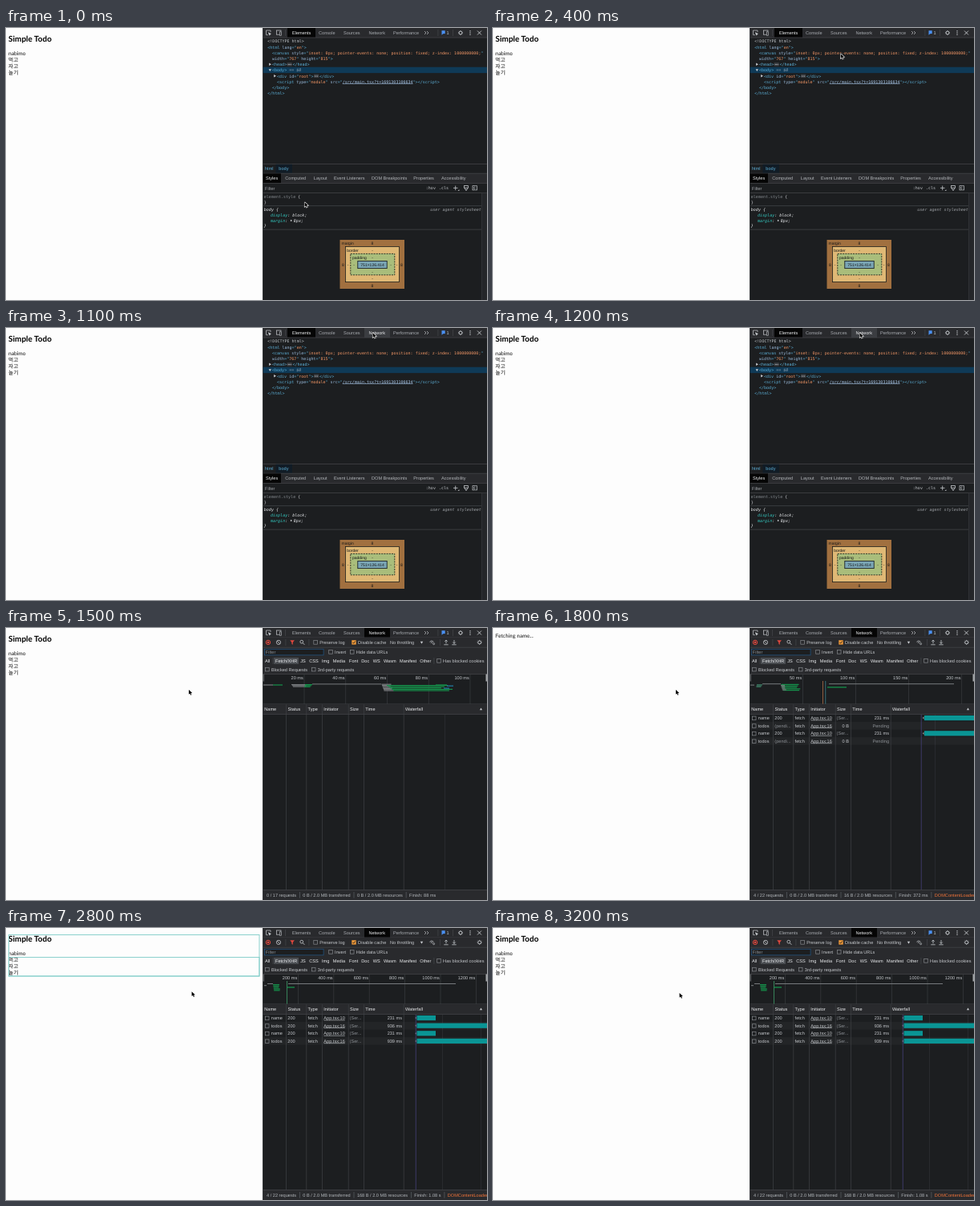
Animation of 600 by 339 pixels, one loop 3.3 s. Source, as an HTML page with a canvas:

```html
<!DOCTYPE html>
<html lang="en">
<head>
<meta charset="utf-8">
<title>Simple Todo</title>
<style>
html, body { margin: 0; width: 100%; height: 100%; overflow: hidden; background: #fdfdfd; }
canvas { display: block; width: 600px; height: 339px; }
</style>
</head>
<body>
<canvas id="stage"></canvas>
<script>
const LOOP = 3300, STEP = 100;
const cv = document.getElementById('stage');
const dpr = window.devicePixelRatio || 1;
cv.width = 600 * dpr;
cv.height = 339 * dpr;
const c = cv.getContext('2d');

const UI = '"Liberation Sans", Arial, sans-serif';
const MONO = '"DejaVu Sans Mono", monospace';
const PAGE = 'Lato, "Noto Sans CJK KR", "Noto Sans CJK", sans-serif';
const BG = '#1c1e20', BAR = '#292a2d', LINE = '#414347', TXT = '#c6c9cd', DIM = '#8c9095', WHITE = '#eceef0';
const TAG = '#5db0d7', ATTR = '#9bbbdc', VAL = '#f29766', TEAL = '#0a9595', GREEN = '#15904a';

function box(x, y, w, h, col) { c.fillStyle = col; c.fillRect(x, y, w, h); }
function frame(x, y, w, h, col, lw = 1) { c.strokeStyle = col; c.lineWidth = lw; c.strokeRect(x, y, w, h); }
function path(pts, col, lw = .8, fill = false) {
  c.beginPath();
  for (let i = 0; i < pts.length; i += 2) c.lineTo(pts[i], pts[i + 1]);
  if (fill) { c.closePath(); c.fillStyle = col; c.fill(); }
  else { c.strokeStyle = col; c.lineWidth = lw; c.stroke(); }
}
function ring(x, y, r, col, lw = .8) {
  c.beginPath(); c.arc(x, y, r, 0, 7);
  c.strokeStyle = col; c.lineWidth = lw; c.stroke();
}
function disc(x, y, r, col) { c.beginPath(); c.arc(x, y, r, 0, 7); c.fillStyle = col; c.fill(); }
function hline(y, x = 320, x2 = 600, col = LINE) { box(x, y, x2 - x, .8, col); }
function vline(x, y, y2, col = LINE) { box(x, y, .8, y2 - y, col); }

// y is the middle of the capitals; returns the width. Type is set at 10x for exact advances.
function text(s, x, y, col = TXT, o = {}) {
  const size = o.size || 5.6;
  c.save();
  c.translate(x, y + .36 * size);
  c.scale(.1, .1);
  c.textRendering = 'geometricPrecision';
  c.font = `${o.style || ''} ${size * 10}px ${o.font || UI}`;
  c.textAlign = o.align || 'left';
  c.fillStyle = col;
  c.fillText(s, 0, 0);
  const w = c.measureText(s).width / 10;
  c.restore();
  return w;
}
// Pairs of string and colour, set in monospace.
function code(x, y, runs, style = '') {
  for (let i = 0; i < runs.length; i += 2)
    x += text(runs[i], x, y, runs[i + 1], { font: MONO, size: 5.03, style });
  return x;
}
function dots(x, y) {
  box(x, y - 2, 6, 4.2, '#3c4045');
  for (let i = 0; i < 3; i++) disc(x + 1.4 + i * 1.6, y + .2, .5, TXT);
}
function check(x, y, label, on) {
  if (on) {
    box(x, y - 2.7, 5.4, 5.4, '#f29a38');
    path([x + 1.2, y, x + 2.3, y + 1.3, x + 4.3, y - 1.4], '#222', .9);
  } else frame(x + .4, y - 2.3, 4.6, 4.6, '#85888c', .7);
  if (label) text(label, x + 7.8, y);
}
function tri(x, y, dir, col = TXT, r = 1.7) {
  if (dir === 'right') path([x - r * .7, y - r, x + r, y, x - r * .7, y + r], col, 0, true);
  else {
    const k = dir === 'up' ? -1 : 1;
    path([x - r, y - r * .7 * k, x + r, y - r * .7 * k, x, y + r * k], col, 0, true);
  }
}
function gear(x, y) {
  for (let i = 0; i < 8; i++) {
    const a = i * Math.PI / 4, u = Math.cos(a), v = Math.sin(a);
    path([x + u * 2, y + v * 2, x + u * 3, y + v * 3], TXT, .9);
  }
  ring(x, y, 1.9, TXT, .8);
}

function drawTabs(active, hover) {
  box(320, 0, 280, 12, BAR);
  path([327, 8.7, 324.5, 8.7, 324.5, 3, 330, 3, 330, 5], TXT, .7);
  path([326.8, 5.2, 330.8, 7, 328.6, 9.6], TXT, .8, true);
  frame(337.5, 3, 5.5, 5.2, TXT, .7);
  box(341, 4.5, 3, 5, BAR);
  frame(341.3, 4.8, 2.3, 4.4, TXT, .6);
  vline(348, 2, 10);
  const tabs = [['Elements', 357], ['Console', 390], ['Sources', 421], ['Network', 452.4], ['Performance', 483]];
  const back = { Elements: [351, 35], Network: [447, 32] };
  for (const [name, x] of tabs) {
    if (name === active) box(back[name][0], 0, back[name][1], 12, '#050505');
    else if (name === hover) box(back[name][0], 0, back[name][1], 12, '#3b3d41');
    text(name, x, 6, name === active || name === hover ? WHITE : '#a9adb2');
  }
  for (const x of [522, 525]) path([x, 4, x + 2, 6, x, 8], TXT, .7);
  vline(538.5, 2, 10);
  box(543.5, 3.2, 4.2, 3.9, '#4a90f0');
  path([543.5, 7, 545.5, 7, 543.5, 8.8], '#4a90f0', 0, true);
  text('1', 549.6, 6, TXT);
  vline(557, 2, 10);
  gear(567, 6);
  for (const y of [3.7, 6, 8.3]) disc(579, y, .7, TXT);
  path([588, 3.5, 593, 8.5], TXT, .9);
  path([593, 3.5, 588, 8.5], TXT, .9);
  hline(11.6);
}

function drawDom() {
  const attr = (n, v) => [' ' + n, ATTR, '="', TAG, v, VAL, '"', TAG];
  code(326.3, 16.6, ['<!DOCTYPE html>', '#c3c7cb']);
  code(326.3, 23.7, ['<html', TAG, ...attr('lang', 'en'), '>', TAG]);
  code(332, 30.9, ['<canvas', TAG,
    ...attr('style', 'inset: 0px; pointer-events: none; position: fixed; z-index: 1000000000;')]);
  code(332, 38.1, ['width', ATTR, '="', TAG, '767', VAL, '"', TAG, ...attr('height', '815'), '>', TAG]);
  tri(329.3, 45.2, 'right');
  dots(code(332, 45.2, ['<head>', TAG]) + .5, 45.2);
  code(357.4, 45.2, ['</head>', TAG]);
  box(320, 48.7, 280, 7.4, '#0f3a57');
  tri(329.3, 52.4, 'down');
  const x = code(332, 52.4, ['<body>', TAG]);
  code(x, 52.4, [' == $0', '#8fa3b3'], 'italic');
  tri(335.3, 59.7, 'right');
  dots(code(338, 59.7, ['<div', TAG, ...attr('id', 'root'), '>', TAG]) + .7, 59.7);
  code(391, 59.7, ['</div>', TAG]);
  const a = code(338, 67, ['<script', TAG, ...attr('type', 'module'), ' src', ATTR, '="', TAG]);
  const b = code(a, 67, ['/src/main.tsx?t=1691303106634', '#a9c7e8']);
  box(a, 69.4, b - a, .6, '#a9c7e8');
  code(b, 67, ['"></' + 'script>', TAG]);
  code(332, 74.2, ['</body>', TAG]);
  code(326.3, 81.5, ['</html>', TAG]);
}

function drawBoxModel() {
  const k = '#171717', o = { size: 5, align: 'center' };
  box(416.5, 264, 80.5, 61, '#a1703f');
  box(423, 272, 68, 45, '#dfb875');
  frame(423.4, 272.4, 67.2, 44.2, k, .8);
  box(429.5, 281, 55.5, 27, '#a9bd7b');
  c.setLineDash([2, 1.2]);
  frame(429.8, 281.4, 55, 26.4, k, .8);
  c.setLineDash([]);
  box(438.5, 290, 37, 10, '#7aa5b5');
  frame(438.8, 290.4, 36.4, 9.2, k, .8);
  text('margin', 418.5, 268.2, k, { size: 5 });
  text('border', 425.3, 276.8, k, { size: 5 });
  text('padding', 432, 285.8, k, { size: 5 });
  text('751×126.414', 457, 295, k, o);
  for (const [x, y] of [[457, 268.2], [457, 321], [420.3, 295], [493.5, 295]]) text('8', x, y, k, o);
  for (const [x, y] of [[457, 276.8], [457, 312.5], [457, 285.8], [457, 304], [426.5, 295], [487.7, 295], [434, 295], [480, 295]])
    text('-', x, y, k, o);
}

function drawElements(hover) {
  drawTabs('Elements', hover);
  drawDom();
  hline(169);
  box(336.5, 169.8, 20.5, 11, '#111c26');
  text('html', 323, 175.3, TAG);
  text('body', 340.3, 175.3, TAG);
  box(320, 181, 280, 12, BAR);
  hline(180.8);
  box(320, 181.4, 23, 12, '#050505');
  text('Styles', 324, 187.3, WHITE);
  [['Computed', 348.3], ['Layout', 383.8], ['Event Listeners', 409], ['DOM Breakpoints', 456],
   ['Properties', 508.3], ['Accessibility', 543]].forEach(([s, x]) => text(s, x, 187.3, '#b3b7bb'));
  hline(193);
  text('Filter', 323, 199.6, '#a0a4a8');
  code(523.8, 199.6, [':hov', TXT]);
  code(540, 199.6, ['.cls', TXT]);
  path([558, 199.4, 563.5, 199.4], TXT);
  path([560.7, 196.6, 560.7, 202.2], TXT);
  path([563.6, 203, 565.4, 203, 565.4, 201.2], TXT, 0, true);
  frame(571.5, 196.6, 5, 2.6, TXT, .8);
  path([572, 199.5, 574, 202.6, 576, 199.5], TXT, .9);
  frame(582, 196.7, 5.6, 5.2, TXT, .7);
  vline(585.3, 196.7, 202);
  path([585, 197.8, 583, 199.3, 585, 200.8], TXT, .7);
  hline(205);
  code(321.8, 210, ['element.style', '#858a8f', ' {', TXT]);
  code(321.8, 217, ['}', TXT]);
  hline(221.3, 320, 593);
  code(321.8, 226.2, ['body {', WHITE], 'italic');
  code(529.3, 226.2, ['user agent stylesheet', '#a0a4a8'], 'italic');
  code(330, 233.2, ['display', '#35c9c0', ': block;', WHITE], 'italic');
  const x = code(330, 240, ['margin', '#35c9c0', ': ', WHITE], 'italic');
  tri(x + 1.6, 240, 'right', TXT, 1.3);
  code(x + 4.6, 240, ['8px;', WHITE], 'italic');
  code(321.8, 246.2, ['}', WHITE], 'italic');
  hline(250.7, 320, 593);
  box(593.5, 205.8, 6.5, 134, '#242629');
  vline(593.2, 205.8, 339, '#34363a');
  drawBoxModel();
}

function drawNetTools() {
  box(320, 12, 280, 45, BAR);
  ring(327, 17.9, 2.7, '#e0483e', 1);
  box(325.8, 16.7, 2.4, 2.4, '#e0483e');
  ring(340, 17.9, 2.6, TXT, .8);
  path([338.2, 16, 341.8, 19.8], TXT, .8);
  vline(348.5, 14, 22);
  path([354.3, 15.3, 359.9, 15.3, 357.8, 18, 357.8, 20.8, 356.4, 20, 356.4, 18], '#e0483e', 0, true);
  ring(368.8, 17.2, 1.9, TXT, .8);
  path([370.2, 18.6, 372.4, 20.8], TXT, .9);
  vline(377.5, 14, 22);
  check(383.4, 17.9, 'Preserve log');
  check(431.3, 17.9, 'Disable cache', true);
  text('No throttling', 479, 17.9);
  tri(518.5, 18, 'down');
  for (const r of [1.6, 3.4]) {
    c.beginPath(); c.arc(531, 19.6, r, -2.4, -.75);
    c.strokeStyle = TXT; c.lineWidth = .8; c.stroke();
  }
  ring(533.6, 19.7, 1, TXT, .7);
  vline(541, 14, 22);
  for (const [x, k] of [[549, -1], [559, 1]]) {
    path([x, 15, x, 19.4], TXT);
    path([x - 1.7, 17.2 + k * .4, x, 17.2 + k * 2.2, x + 1.7, 17.2 + k * .4], TXT);
    path([x - 2.7, 20.8, x + 2.7, 20.8], TXT);
  }
  gear(590.7, 17.9);
  hline(23.8);
  box(322, 26, 74.5, 8, BG);
  frame(322.4, 26.3, 73.7, 7.5, '#24527c', .8);
  text('Filter', 323.8, 30.2, DIM);
  check(402.3, 29.9, 'Invert');
  check(429, 29.9, 'Hide data URLs');
  box(334, 36.9, 31, 8, '#4b4e53');
  [['All', 323], ['Fetch/XHR', 336], ['JS', 367.3], ['CSS', 378.3], ['Img', 394], ['Media', 407.8],
   ['Font', 428], ['Doc', 443.3], ['WS', 457.8], ['Wasm', 471], ['Manifest', 491], ['Other', 516.3]]
    .forEach(([s, x]) => text(s, x, 40.9, WHITE));
  vline(332.5, 37, 45);
  vline(533.5, 37, 45);
  check(537.3, 40.9, 'Has blocked cookies');
  check(323.2, 51.6, 'Blocked Requests');
  check(381, 51.6, '3rd-party requests');
  hline(57);
}

// Staggered strips of requests in the overview.
function strips(x, y, w, n, dx, gap, col) {
  for (let i = 0; i < n; i++) box(x + i * dx, y + i * gap, w - (i % 3) * w * .08, 1.2, col);
}
function drawOverview(s) {
  for (let i = 1; ; i++) {
    const x = s.first + (i - 1) * s.pitch;
    if (x > 599) break;
    vline(x, 58, 95, '#35373b');
    text(i * s.unit + ' ms', x - .8, 62, TXT, { align: 'right' });
  }
  const g = '#777a7d';
  if (s.view === 'idle') {
    box(321, 70.4, 12, 1.2, g);
    box(333, 70.4, 12, 1.2, GREEN);
    strips(356, 70, 19, 3, 1, 1.2, g);
    strips(373, 70, 9, 3, -.5, 1.3, GREEN);
    box(382, 69.4, 86, 1, g);
    strips(468.5, 69.6, 12, 7, .5, 1.3, g);
    strips(475, 71, 76, 5, 2, 1.6, GREEN);
    box(536, 70.4, 14, 1, GREEN);
    box(550, 71.6, 8, 1.1, '#2386b5');
    box(546, 74.5, 7, 1.1, '#2386b5');
  } else if (s.view === 'load') {
    box(321, 70.6, 5, 1, g);
    strips(329, 70.2, 7, 3, -.3, 1.2, '#3c7a63');
    box(336, 69.2, 23, 1, g);
    strips(359.5, 69.8, 22, 5, .6, 1.8, GREEN);
    strips(359, 71, 5, 4, .6, 1.8, g);
    box(417, 73.2, 24, 1.3, GREEN);
    box(419, 69.2, 156, 1, g);
    vline(411, 66, 95, '#b0704a');
    vline(414.4, 66, 95, '#3f8590');
  } else {
    box(322, 71.2, 3, 1, g);
    box(326, 69, 7, 1, g);
    strips(333, 70, 8, 5, .3, 1.8, GREEN);
    box(351, 73.3, 9, 1.3, GREEN);
    box(352, 69, 209, 1, g);
    vline(350, 66, 95, '#3f9a68');
  }
  box(320, 57.5, 1.5, 9, '#a5a8ab');
  box(598.5, 57.5, 1.5, 9, '#a5a8ab');
  hline(94.5);
}

function drawTable(s) {
  box(320, 95.2, 280, 12, BAR);
  for (const x of s.grid) vline(x, 108, 326, '#2c2e32');
  (s.rows || []).forEach((r, i) => {
    const y = 112.1 + i * 9.6;
    if (i % 2) box(320, y - 4.8, 280, 9.6, 'rgba(255,255,255,.03)');
    check(323, y + .3);
    text(i % 2 ? 'todos' : 'name', 330.8, y);
    text(r.done ? '200' : '(pendi...', 351.3, y, r.done ? TXT : DIM);
    text('fetch', 376.6, y);
    const link = i % 2 ? 'App.tsx:16' : 'App.tsx:10';
    const w = text(link, 396.3, y);
    box(396.3, y + 2.6, w, .6, TXT);
    if (r.done) text('(Ser...', 428.6, y, DIM);
    else text('0 B', 444, y, TXT, { align: 'right' });
    text(r.time, 494, y, r.time === 'Pending' ? DIM : TXT, { align: 'right' });
    if (r.end) {
      box(s.start, y - 3.1, r.end - s.start, 6.2, TEAL);
      path([s.start - .6, y - 1.6, s.start - 2, y, s.start - .6, y + 1.6], '#b9c3c4', 0, true);
    }
  });
  if (s.mark) vline(s.mark, 108, 326, '#454078');
  for (const x of [349.2, 374.4, 394.2, 426.8, 446.2, 495.8]) vline(x, 95.2, 326, '#3a3c40');
  [['Name', 322.3], ['Status', 351.5], ['Type', 376.6], ['Initiator', 396.3], ['Size', 429], ['Time', 448.3], ['Waterfall', 498]]
    .forEach(([t, x]) => text(t, x, 101.2, WHITE));
  tri(592.5, 101.2, 'up', TXT, 1.6);
  hline(107);
}

function drawStatus(s) {
  box(320, 326, 280, 13, BAR);
  hline(326);
  let x = 325;
  s.status.forEach((t, i) => {
    if (i) vline(x - 4.3, 329, 336.5, '#55585c');
    x += text(t, x, 332.8, t.startsWith('DOM') ? '#f0743a' : '#b3b7bb') + 8.2;
  });
}

function row(time, done, end) { return { time, done, end }; }
const sum = (n, size, fin) => [n + ' requests', '0 B / 2.0 MB transferred', size + ' B / 2.0 MB resources', 'Finish: ' + fin];
const dom = 'DOMContentLoaded';
const named = row('231 ms', true, 600), wait = row('Pending', false, 0);
const idle = { view: 'idle', unit: 20, first: 371.6, pitch: 51.75, grid: [547], status: sum('0 / 17', 0, '88 ms') };
const load = { view: 'load', unit: 50, first: 386, pitch: 66.1, grid: [551], start: 538, mark: 533.8,
  rows: [named, wait, named, wait], status: [...sum('4 / 22', 16, '372 ms'), dom] };
const wide = { ...load, first: 353.6, pitch: 33.8 };
const half = { ...wide, rows: [named, row('Pending', true, 600), named, wait] };
const full = { view: 'full', unit: 200, first: 364, pitch: 44.4, grid: [544, 592], start: 512.5, mark: 510.8,
  rows: [row('231 ms', true, 536), row('936 ms', true, 600), row('231 ms', true, 536), row('939 ms', true, 600)],
  status: [...sum('4 / 22', 168, '1.08 s'), dom] };

function drawPage(t) {
  box(0, 0, 320, 339, '#fdfdfd');
  const o = { font: PAGE, size: 6.67 };
  if (t >= 1600 && t < 2500) {
    text('Fetching name...', 3, 9.9, '#111', o);
    return;
  }
  text('Simple Todo', 3, 13.1, '#000', { font: PAGE, size: 10, style: 'bold' });
  ['nabimo', '먹고', '자고', '놀기'].forEach((s, i) => text(s, 3, 31.8 + i * 8.05, '#111', o));
  if (t >= 2500 && t < 3000) {
    frame(3.5, 8.5, 312.5, 51.5, '#7fcdc8', .9);
    frame(3.5, 36.5, 312.5, 23.5, '#7fcdc8', .9);
  }
}

// Pointer stops: time, x, y.
const stops = [[0, 372.5, 217], [400, 433.6, 32], [700, 457.5, 6], [1200, 457.5, 6],
  [1500, 228, 77], [1800, 228, 77], [2500, 231, 78], [3200, 232.6, 81], [3300, 232.6, 81]];
function pointer(t) {
  const i = stops.findIndex((s, n) => n && t <= s[0]);
  const a = stops[i - 1], b = stops[i];
  const u = (t - a[0]) / (b[0] - a[0]), e = u * u * (3 - 2 * u);
  return [a[1] + (b[1] - a[1]) * e, a[2] + (b[2] - a[2]) * e];
}
function drawPointer(x, y) {
  const p = [0, 0, 0, 5.8, 1.4, 4.6, 2.4, 6.8, 3.4, 6.3, 2.5, 4.2, 4.3, 4.1].map((v, i) => v + (i % 2 ? y : x));
  path([...p, p[0], p[1]], '#fff', 1.1);
  path(p, '#000', 0, true);
}

function draw(t) {
  c.setTransform(dpr, 0, 0, dpr, 0, 0);
  const [px, py] = pointer(t);
  drawPage(t);
  box(320, 0, 280, 339, BG);
  if (t < 1300) {
    drawElements(py < 12 && px > 447 && px < 479 ? 'Network' : '');
  } else {
    const s = t < 1700 ? idle : t < 2000 ? load : t < 2500 ? wide : t < 2700 ? half : full;
    drawTabs('Network', '');
    drawNetTools();
    drawOverview(s);
    drawTable(s);
    drawStatus(s);
  }
  vline(320, 0, 339, '#3a3c3f');
  drawPointer(px, py);
}

let last = -1;
const t0 = performance.now();
function tick() {
  const t = Math.floor((performance.now() - t0) % LOOP / STEP) * STEP;
  if (t !== last) draw(last = t);
  requestAnimationFrame(tick);
}
tick();
</script>
</body>
</html>
```
